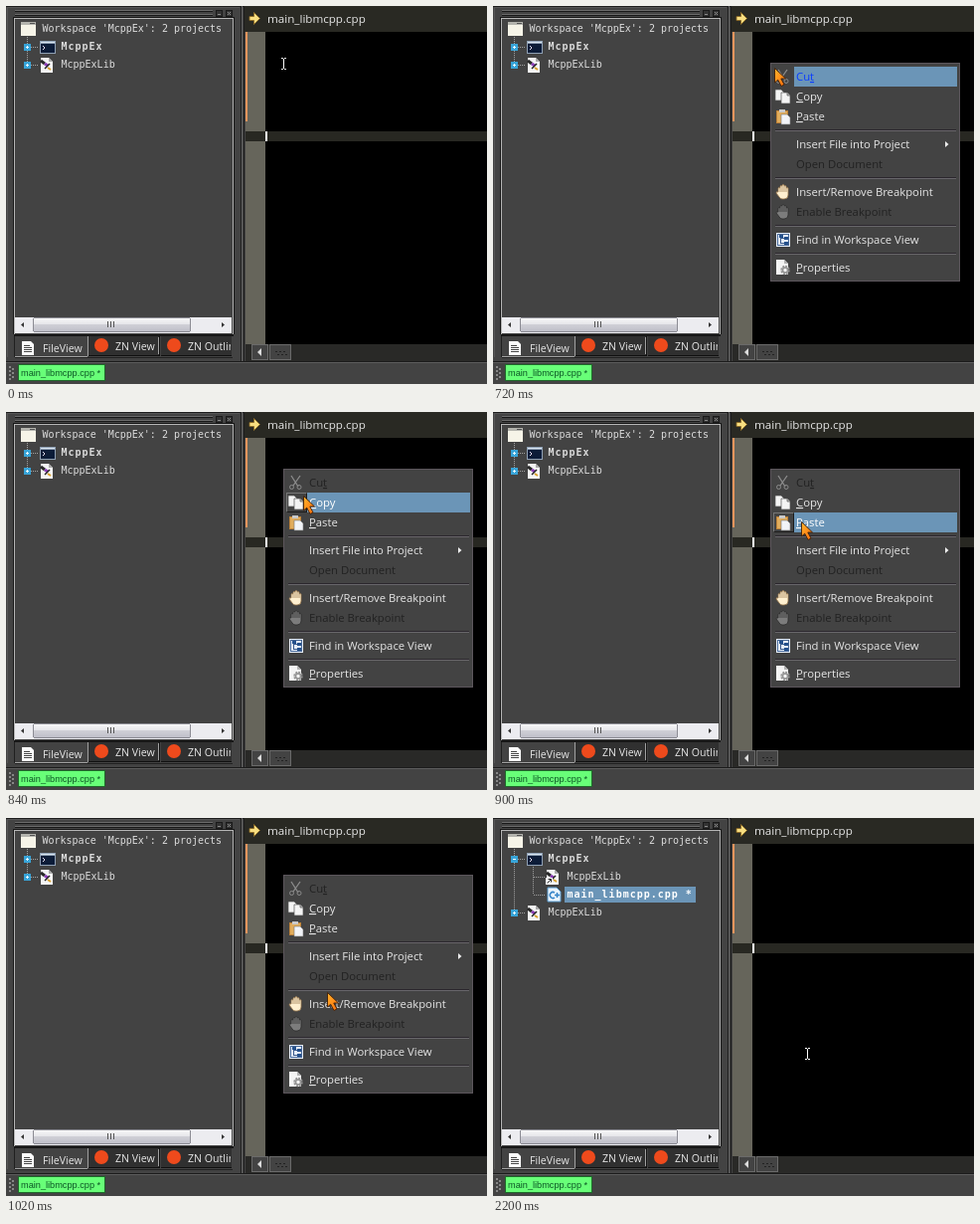
An HTML page for the animation above (4260 ms loop, 484 by 380 pixels).

```html
<!DOCTYPE html>
<html lang="en">
<head>
<meta charset="utf-8">
<title>Find in Workspace View</title>
<style>
html, body { margin: 0; width: 100%; height: 100%; overflow: hidden; background: #434343; }
svg { display: block; }
rect, .crisp { shape-rendering: crispEdges; }
text { font: 11.3px "Open Sans", sans-serif; fill: #e6e6e6; white-space: pre; }
tspan { text-decoration: underline; }
.tree text { font: 10px "DejaVu Sans Mono", monospace; fill: #dcdcdc; }
.tree .bold { font-weight: bold; letter-spacing: 1px; }
.dots { stroke: #a0a0a0; stroke-dasharray: 1 1; fill: none; shape-rendering: crispEdges; }
.off text { fill: #222; }
.hot text { fill: #fff; }
.off.hot text { fill: #0a3cff; }
.row .bar, .row .box { visibility: hidden; }
.hot .bar, .hot .box { visibility: inherit; }
</style>
</head>
<body>
<svg width="484" height="380" viewBox="0 0 484 380">
<defs>
  <linearGradient id="thumb" x2="0" y2="1">
    <stop stop-color="#f8f8f8"/><stop offset=".45" stop-color="#e6e6ea"/>
    <stop offset=".5" stop-color="#cfcfd6"/><stop offset="1" stop-color="#bebec8"/>
  </linearGradient>
  <linearGradient id="fire" x2="1" y2="1">
    <stop stop-color="#ffb52e"/><stop offset="1" stop-color="#ff6a08"/>
  </linearGradient>
  <g id="plus"><rect width="7" height="7" fill="#38a4d8"/><path class="crisp" d="M2 3.5h3M3.500 2v3" stroke="#e8f8ff"/></g>
  <g id="minus"><rect width="7" height="7" fill="#38a4d8"/><path class="crisp" d="M2 3.5h3" stroke="#e8f8ff"/></g>
  <g id="console">
    <rect width="16" height="13" fill="#8fa0b4"/><rect x="1" y="3" width="14" height="9" fill="#0c1c38"/>
    <rect x="1" y="1" width="14" height="1" fill="#d8e4f0"/><path d="M3 5l2 2-2 2" stroke="#dde" fill="none"/>
  </g>
  <g id="lib">
    <path d="M1 0h8l4 4v11h-12z" fill="#f4f4f4"/><path d="M9 0v4h4" fill="#aaa"/>
    <path d="M1 3l4 3" stroke="#2a2a2a" stroke-width="3"/><path d="M5 6l3 2" stroke="#8c3cb8" stroke-width="3"/>
    <path d="M5 11l5-5" stroke="#222" stroke-width="1.500"/><path d="M8 10l3 2" stroke="#d8a028" stroke-width="2"/>
  </g>
  <g id="linkLib">
    <use href="#lib"/><rect y="8" width="7" height="7" fill="#fff"/><path d="M1.500 13.500l4-4M2.500 9.500h3v3" stroke="#222" fill="none"/>
  </g>
  <g id="cpp">
    <path d="M0 0h9l4 4v10h-13z" fill="#eaf4fc" stroke="#5a9cd0"/>
    <path d="M7 5a3 3 0 1 0 0 5M7 7.500h5M9.500 5v5" fill="none" stroke="#3484c8" stroke-width="1.500"/>
  </g>
  <g id="cut" fill="none" stroke="#8c8c8c">
    <path d="M3 1l7 11M12 1l-7 10" stroke-width="1.300"/><circle cx="3.500" cy="12.500" r="2"/><circle cx="11" cy="12.500" r="2"/>
  </g>
  <g id="copy" fill="#f4f4f4" stroke="#555" stroke-width=".7">
    <path d="M0 1h6l3 3v8h-9z"/><path d="M6 4h6l3 3v8h-9z"/><path d="M12 4v3h3" fill="#bbb"/>
  </g>
  <g id="paste">
    <rect x="1" y="2" width="12" height="13" fill="#bd8137"/><rect x="2" y="3" width="10" height="11" fill="#e0ac5c"/>
    <rect x="4" y="1" width="6" height="3" fill="#c9c9c9"/><path d="M6 6h6l3 3v7h-9z" fill="#f2f4f8" stroke="#777" stroke-width=".6"/>
  </g>
  <g id="hand">
    <path d="M3 8V4q1-1 2 0V2q1-1 2 0V1q1-1 2 0v1q1-1 2 0v2q1-1 2 0v7q0 4-4 4H7q-2 0-3-2L1 9q0-2 2-1z"/>
    <path d="M5 4v4M7 2v6M9 2v6M11 4v4" stroke-width=".7"/>
  </g>
  <g id="find">
    <rect x="1" y="1" width="14" height="14" fill="#e6eefa"/><rect x="2" y="2" width="12" height="12" fill="#4a6a98"/>
    <rect x="3" y="3" width="10" height="10" fill="#e6eefa"/>
    <path class="crisp" d="M5.500 4v8M5 6.500h4M5 11.500h4" stroke="#3a5a8c" fill="none"/>
    <path d="M4 3h4v3h-4zM9 5h4v3h-4zM9 10h4v3h-4z" fill="#24508c"/>
  </g>
  <g id="props">
    <path d="M1 0h8l4 4v11h-12z" fill="#f4f4f4"/><path d="M9 0v4h4" fill="#b4b4b4"/>
    <circle cx="10" cy="10.500" r="3.500" fill="none" stroke="#959595" stroke-width="2.500" stroke-dasharray="1.800 .9"/>
    <circle cx="10" cy="10.500" r="2.500" fill="none" stroke="#959595" stroke-width="1.500"/>
  </g>
</defs>

<rect width="484" height="380" fill="#434343"/>

<!-- side panel -->
<path class="crisp" d="M1.500 353V1.500H235" fill="none" stroke="#565656"/>
<path class="crisp" d="M0 .5H240M236.500 0V357M239.500 0V357" stroke="#1c1c1c"/>
<path class="crisp" d="M237.500 0V357" stroke="#666"/>
<path class="crisp" d="M9 4.500H208M9 8.500H208" stroke="#6a6a6a"/>
<path class="crisp" d="M9 5.500H208M9 9.500H208" stroke="#181818"/>
<path class="crisp" d="M211.500 4.500h6v6h-6zM221.500 4.500h6v6h-6z" fill="#333" stroke="#1a1a1a"/>
<path d="M213 8.500h3M223 6l3 3m0-3l-3 3" stroke="#888"/>
<path class="crisp" d="M7.500 330V11.500H229.500V330" fill="none" stroke="#181818"/>
<path class="crisp" d="M8.500 330V12.500H228.500V330" fill="none" stroke="#b4b4b4"/>

<!-- horizontal scroll bar -->
<rect x="9" y="313" width="218" height="16" fill="#ececf0"/>
<rect x="27.500" y="313.500" width="158" height="14" rx="2" fill="url(#thumb)" stroke="#8c8c94"/>
<path d="M18 318v5l-3-2.500zM217 318v5l3-2.500z" fill="#333"/>
<path class="crisp" d="M102.500 317v6M105.500 317v6M108.500 317v6" stroke="#555"/>

<!-- panel tabs -->
<rect x="8" y="330" width="221" height="2" fill="#181818"/>
<rect x="83" y="332" width="71" height="19" fill="#303030"/>
<rect x="156" y="332" width="71" height="19" fill="#303030"/>
<path class="crisp" d="M83 351.500H154.500V332M156 351.500H227" fill="none" stroke="#111"/>
<path class="crisp" d="M153.500 333v17M82.500 332v20M9 352.500H82" stroke="#a0a0a0"/>
<path class="crisp" d="M8.500 332v21M9 353.500H228" stroke="#202020" fill="none"/>
<path d="M16 337h9l3 3v11h-12z" fill="#fff"/>
<path class="crisp" d="M18 341.500h6M18 343.500h8M18 345.500h8M18 347.500h8" stroke="#444"/>
<circle cx="96" cy="341" r="7" fill="#ee4a1c"/>
<circle cx="169" cy="341" r="7" fill="#ee4a1c"/>
<text x="37" y="348" style="font-size:10.600px">FileView</text>
<text x="110" y="346" style="font-size:10.600px">ZN View</text>
<svg x="156" y="332" width="70" height="19"><text x="27" y="14" style="font-size:10.600px">ZN Outline</text></svg>

<!-- workspace tree -->
<g class="tree">
  <path d="M15 17h15v13h-15z" fill="#f6f4e8"/><rect x="15" y="16" width="15" height="3" fill="#b4b4ae"/>
  <rect x="24" y="17" width="5" height="1" fill="#555"/>
  <text x="36.500" y="26">Workspace 'McppEx': 2 projects</text>
  <path class="dots" d="M25 41.500h8"/>
  <use href="#console" x="34" y="35"/>
  <text class="bold" x="55.500" y="44">McppEx</text>
  <g id="closed">
    <path class="dots" d="M21.500 31v28M25 59.500h8"/>
    <use href="#plus" x="18" y="38"/><use href="#plus" x="18" y="56"/>
    <use href="#lib" x="34" y="52"/><text x="55.500" y="62">McppExLib</text>
  </g>
  <g id="opened">
    <path class="dots" d="M21.500 31v64M25 95.500h8M40.500 49v28M41 59.500h11M41 77.500h11"/>
    <use href="#minus" x="18" y="38"/><use href="#plus" x="18" y="92"/>
    <use href="#linkLib" x="53" y="52"/><text x="74.500" y="62">McppExLib</text>
    <use href="#cpp" x="55" y="70"/><rect x="72" y="69" width="132" height="16" fill="#6b95b7"/>
    <text class="bold" x="74.500" y="80" style="fill:#fff">main_libmcpp.cpp *</text>
    <use href="#lib" x="34" y="88"/><text x="55.500" y="98">McppExLib</text>
  </g>
</g>

<!-- editor -->
<rect x="240" width="244" height="26" fill="#292923"/>
<path d="M245 10.500h4.500v-4l6 6-6 6v-4h-4.500z" fill="#f8de80" stroke="#8a6824" stroke-width=".9"/>
<text x="263" y="17" style="font-size:11.600px">main_libmcpp.cpp</text>
<rect x="241" y="26" width="20" height="314" fill="#66655b"/>
<rect x="261" y="26" width="223" height="314"/>
<rect x="241" y="26" width="2" height="90" fill="#f0955c"/>
<rect x="241" y="126" width="243" height="10" fill="#282822"/>
<rect x="261" y="126" width="2" height="10" fill="#fff"/>
<rect x="241" y="340" width="243" height="17" fill="#292927"/>
<path class="crisp" d="M247.500 340.500h16v15h-16zM265.500 340.500h21v15h-21z" fill="#434343" stroke="#6a6a6a"/>
<path d="M257 344v8l-4-4z" fill="#ddd"/>
<path class="crisp" d="M271 347.500h10M273 350.500h10" stroke="#222" stroke-dasharray="2 2"/>

<!-- open documents -->
<path class="crisp" d="M0 357.500H484" stroke="#1c1c1c"/><path class="crisp" d="M0 358.500H484" stroke="#5c5c5c"/>
<path class="crisp" d="M4 362v14M7 364v12" stroke="#888" stroke-width="2" stroke-dasharray="2 2"/>
<rect x="12.500" y="360.500" width="87" height="16" fill="#68ff78" stroke="#1e6a2a"/>
<text x="15" y="372" style="font:9.200px 'Liberation Sans',Arial,sans-serif;fill:#0a5424">main_libmcpp.cpp *</text>

<g id="menu">
  <rect x="279.500" y="57.500" width="190" height="219" fill="#434343" stroke="#5c565c"/>
  <g id="rows"></g>
  <path id="arrow" d="M.5.5V15l3.200-2.800L7 18.500l3-1.500-3.200-6H11.500z" fill="url(#fire)" stroke="#40200a" stroke-width=".9"/>
</g>
<path id="beam" class="crisp" d="M-2 -5.500h2M1 -5.500h2M.5 -5V5M-2 5.500h2M1 5.500h2" stroke="#fff" fill="none"/>
</svg>
<script>
const $ = id => document.getElementById(id);
const use = id => `<use href="#${id}"/>`;
const hand = (fill, line) => `<g fill="${fill}" stroke="${line}" stroke-width=".8">${use('hand')}</g>`;

// top, label, icon, disabled
const items = [
  [61, 'Cu<tspan>t</tspan>', use('cut'), true],
  [81, '<tspan>C</tspan>opy', use('copy')],
  [101, '<tspan>P</tspan>aste', use('paste')],
  [129, 'Insert File into Project', ''],
  [149, 'Open Document', '', true],
  [177, 'Insert/Remove Breakpoint', hand('#fff0d0', '#96744a')],
  [197, 'Enable Breakpoint', hand('#7c7c7c', '#2c2c2c'), true],
  [225, 'Find in Workspace View', use('find')],
  [253, '<tspan>P</tspan>roperties', use('props')]
];

$('rows').innerHTML = items.map(([y, label, icon, off]) => {
  const x = icon ? 303 : 282;
  return `<g class="row${off ? ' off' : ''}" transform="translate(0 ${y})">
    <rect class="bar" x="${x}" width="${467 - x}" height="20" fill="#6b95b7"/>
    ${icon && !off ? `<g class="box crisp" fill="none"><path d="M282.500 19V.5H302" stroke="#777"/>
      <path d="M283 19.500H302.500V1" stroke="#1c1c1c"/></g>` : ''}
    <g transform="translate(284 2)">${icon}</g>
    <text x="305" y="14">${label}</text>
    ${y === 129 ? '<path d="M455 7v6l3.500-3z" fill="#eee"/>' : ''}</g>`;
}).join('') + [125, 173, 221, 249].map(y =>
  `<path class="crisp" d="M284 ${y - .5}H466" stroke="#2c282e"/>
   <path class="crisp" d="M284 ${y + .5}H466" stroke="#68666a"/>`).join('');

const rows = [...document.querySelectorAll('.row')];
const path = [[283, 62], [290, 71], [299, 84], [310, 110], [320, 141],
              [323, 175], [321, 206], [317, 228], [316, 236]];
const place = (el, x, y) => el.setAttribute('transform', `translate(${x} ${y})`);
const show = (el, on) => { el.style.visibility = on ? 'visible' : 'hidden'; };

function draw(t) {
  const found = t >= 2200, open = t >= 60 && !found;
  const moving = t >= 720;
  const [x, y] = moving ? path[Math.min(8, Math.floor((t - 720) / 60))] : [279, 57];
  show($('menu'), open);
  show($('beam'), !open);
  show($('closed'), !found);
  show($('opened'), found);
  place($('arrow'), x, y);
  place($('beam'), ...(found ? [316, 237] : [279, 58]));
  rows.forEach((row, i) => {
    const top = items[i][0];
    row.classList.toggle('hot', moving && y >= top && y < top + 20);
  });
}

const start = performance.now();
function tick(now) {
  draw(Math.max(0, now - start) % 4260);
  requestAnimationFrame(tick);
}
draw(0);
requestAnimationFrame(tick);
</script>
</body>
</html>
```
